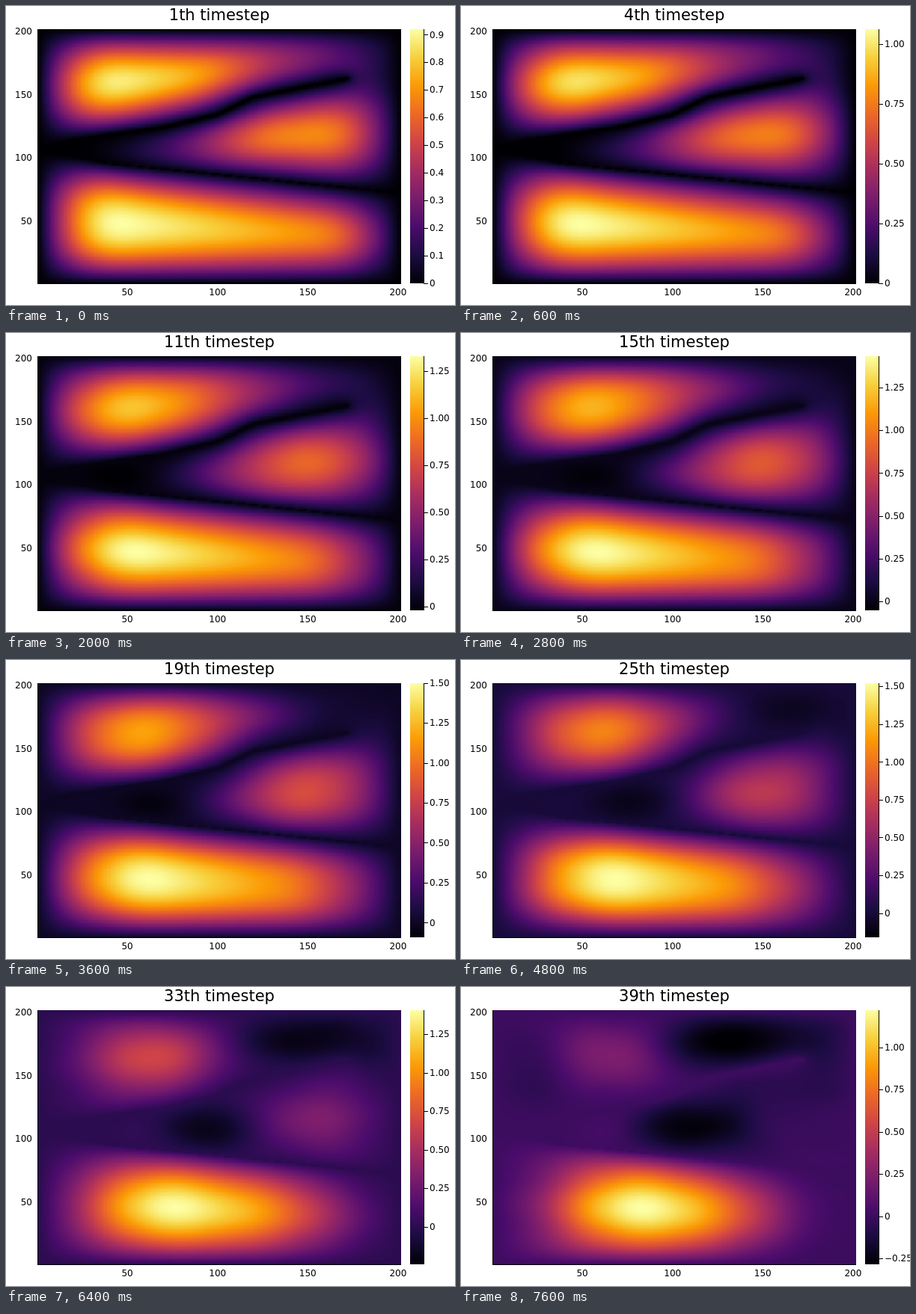
An HTML page with a canvas for the animation above (7800 ms loop, 600x400 px).

```html
<!DOCTYPE html>
<html lang="en">
<head>
<meta charset="utf-8">
<title>Waves between walls</title>
<style>
html, body { margin: 0; width: 100%; height: 100%; overflow: hidden; background: #fff; }
canvas { display: block; }
</style>
</head>
<body>
<canvas id="stage" width="600" height="400"></canvas>
<script>
const STEP = 200, STEPS = 39, N = 201;
const PLOT = { x: 42, y: 31, w: 486, h: 341 };
const BAR = { x: 540, y: 31, w: 18, h: 340 };
const ctx = document.getElementById('stage').getContext('2d');
const grid = document.createElement('canvas');
grid.width = grid.height = N;
const gridCtx = grid.getContext('2d');
const pixels = gridCtx.createImageData(N, N);

const clamp = v => Math.min(1, Math.max(0, v));
const smooth = (a, b, v) => { const s = clamp((v - a) / (b - a)); return s * s * (3 - 2 * s); };

// Height of a polyline at x
function height(points, x) {
  const i = Math.max(1, points.findIndex(p => p[0] >= x));
  const [x0, y0] = points[i - 1], [x1, y1] = points[i];
  return y0 + (y1 - y0) * (x - x0) / (x1 - x0);
}
const TIP = 172;
const upperWall = x => height(
  [[0, 106], [20, 114], [70, 124], [100, 134], [120, 148], [TIP, 162.5]], Math.min(x, TIP));
const lowerWall = x => height([[0, 105], [41, 95.4], [N, 72.2]], x);

// Initial speed: rises away from every wall and fades to the right
const rise = d => Math.sin(Math.PI / 2 * clamp(d / 36)) ** 1.3;
function startSpeed(x, y) {
  const up = upperWall(x), low = lowerWall(x);
  let v = (1 - .0018 * x) * rise(x - 1) * rise(N - x) * rise(y - 1) * rise(N - y);
  if (y < up || x > TIP) v *= rise(Math.abs(y - low));
  if (y > low) v *= rise(Math.hypot(y - up, Math.max(0, x - TIP)));
  return v;
}
const isWall = (x, y) => Math.abs(y - lowerWall(x)) < .35
  || x <= TIP && Math.abs(y - upperWall(x)) < 1.2;

// Wave equation with fixed edges and walls, one stored field per time step
function simulate() {
  const SUB = 3, LEAD = 46, R = (1.2 / SUB) ** 2;
  const free = [], fields = [];
  let old = new Float32Array(N * N), now = new Float32Array(N * N);
  for (let y = 2; y < N; y++) {
    for (let x = 2; x < N; x++) {
      if (isWall(x, y)) continue;
      const i = (N - y) * N + x - 1;
      free.push(i);
      now[i] = startSpeed(x, y);
    }
  }
  for (let k = 1; fields.length < STEPS; k++) {
    if (k >= LEAD && (k - LEAD) % SUB === 0) fields.push(now.slice());
    for (const i of free) {
      const spread = now[i - 1] + now[i + 1] + now[i - N] + now[i + N] - 4 * now[i];
      old[i] = 2 * now[i] - old[i] + R * spread;
    }
    [old, now] = [now, old];
  }
  return fields;
}
const fields = simulate();

// Inferno colour map
const STOPS = ['000004', '1b0c42', '4b0c6b', '781c6d', 'a52c60',
  'cf4446', 'ed6925', 'fb9a06', 'f7d03c', 'fcffa4'];
const rgb = STOPS.map(s => [0, 2, 4].map(i => parseInt(s.slice(i, i + 2), 16)));
const palette = Array.from({ length: 256 }, (_, k) => {
  const p = k / 255 * 9, i = Math.min(8, Math.floor(p));
  return rgb[i].map((c, j) => c + (rgb[i + 1][j] - c) * (p - i));
});

// Ends of the colour scale
const highest = n => 1.526 * Math.cos(.0412 * (n - 22.4));
const lowest = n => -.292 * smooth(4, 42, n);

function drawField(n, min, max) {
  const field = fields[n], scale = max / field.reduce((a, b) => Math.max(a, b));
  field.forEach((u, i) => {
    const [r, g, b] = palette[Math.round(255 * clamp((u * scale - min) / (max - min)))];
    pixels.data.set([r, g, b, 255], 4 * i);
  });
  gridCtx.putImageData(pixels, 0, 0);
  ctx.imageSmoothingEnabled = false;
  ctx.drawImage(grid, PLOT.x, PLOT.y, PLOT.w, PLOT.h);
}

function text(str, x, y, align, size = 12) {
  ctx.font = size + 'px "DejaVu Sans", sans-serif';
  ctx.textAlign = align;
  ctx.fillText(str, x, y);
}

function drawAxes() {
  ctx.fillStyle = '#000';
  ctx.fillRect(42, 31, 1, 341);
  ctx.fillRect(42, 371, 486, 1);
  for (let v = 50; v <= 200; v += 50) {
    text(v, 41.5 + 2.412 * v, 387, 'center');
    text(v, 35, 377 - 1.696 * v, 'right');
  }
}

function drawBar(min, max) {
  const shade = ctx.createLinearGradient(0, BAR.y + BAR.h, 0, BAR.y);
  STOPS.forEach((s, i) => shade.addColorStop(i / 9, '#' + s));
  ctx.fillStyle = shade;
  ctx.fillRect(BAR.x, BAR.y, BAR.w, BAR.h);
  ctx.fillStyle = '#000';
  ctx.fillRect(558, BAR.y, 1, BAR.h);
  const fine = max < 1, gap = fine ? .1 : .25;
  for (let k = Math.ceil(min / gap); k * gap <= max; k++) {
    const y = BAR.y + BAR.h * (max - k * gap) / (max - min);
    const label = k ? (k * gap).toFixed(fine ? 1 : 2).replace('-', '\u2212') : '0';
    ctx.fillRect(558, Math.round(y - .5), 6, 1);
    text(label, 566, y + 3.8, 'left');
  }
}

function draw(n) {
  const min = lowest(n), max = highest(n);
  ctx.fillStyle = '#fff';
  ctx.fillRect(0, 0, 600, 400);
  drawField(n, min, max);
  drawAxes();
  drawBar(min, max);
  text(n + 1 + 'th timestep', 285, 18.5, 'center', 21);
}

let shown = -1;
const start = performance.now();
function tick() {
  const n = Math.floor((performance.now() - start) / STEP) % STEPS;
  if (n !== shown) draw(shown = n);
  requestAnimationFrame(tick);
}
tick();
</script>
</body>
</html>
```
